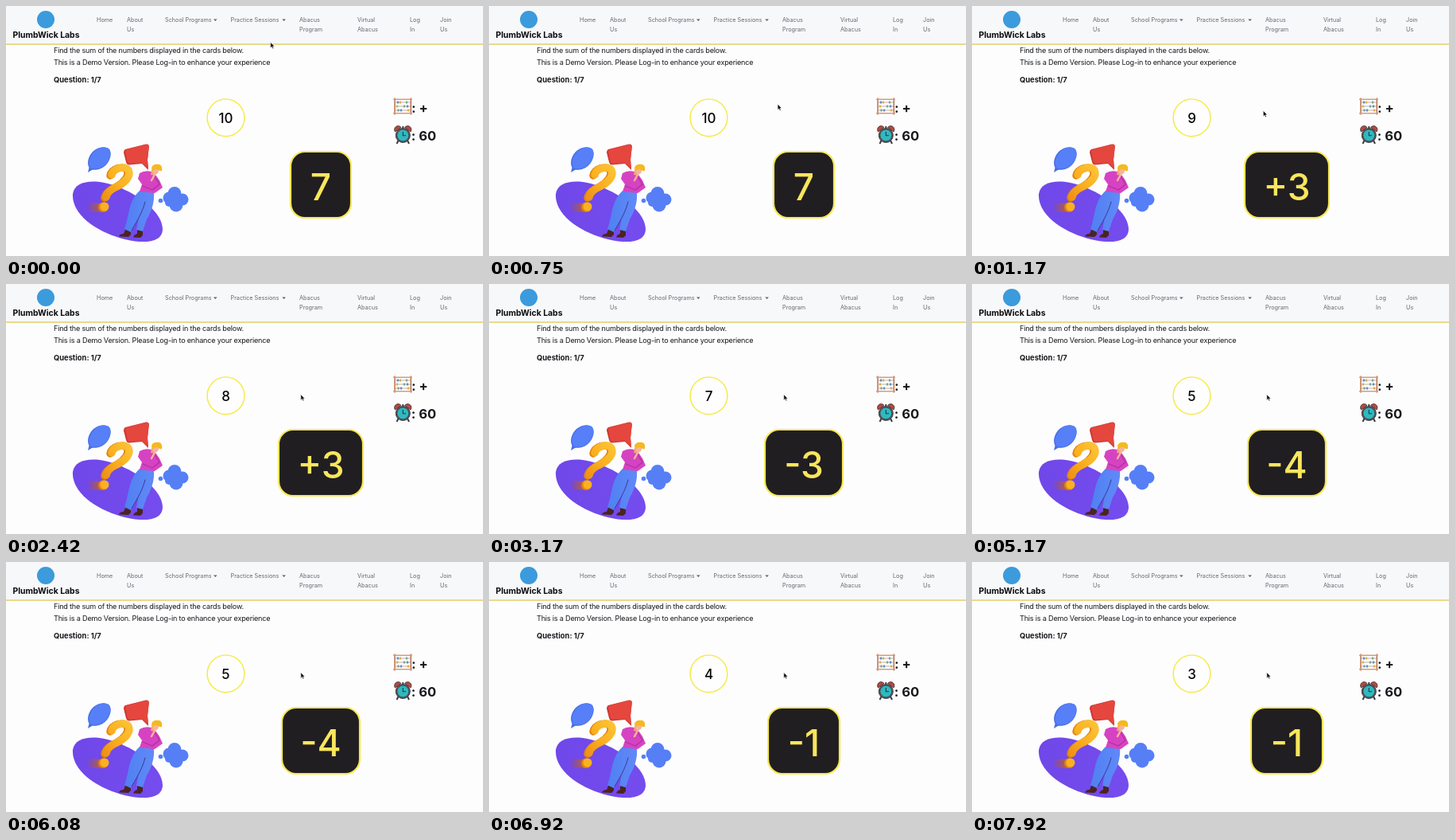
These frames come from a looping animation (600 px wide and 314 px high, 8000 ms). An HTML page:

```html
<!DOCTYPE html>
<html lang="en">
<head>
<meta charset="utf-8">
<title>Abacus practice</title>
<style>
  html, body { margin: 0; width: 100%; height: 100%; overflow: hidden; background: #fdfdfe; }
  svg { display: block; width: 100vw; height: 100vh; }
  text { font-family: Inter, "Open Sans", sans-serif; fill: #16181b; white-space: pre; }
  .nav text { font-size: 7.25px; fill: #66686c; }
  .body { font-size: 9.1px; letter-spacing: -.2px; }
  .bold { font-size: 9.35px; font-weight: 700; }
  .stat { font-size: 16.6px; font-weight: 700; }
  .brand { font-size: 10.4px; font-weight: 700; fill: #0c0c0e; }
  .mid { text-anchor: middle; }
  #count { font-size: 17px; font-weight: 500; fill: #050505; }
  #number { font-size: 46px; font-weight: 500; fill: #f9e65c; }
</style>
</head>
<body>
<svg viewBox="0 0 600 314" preserveAspectRatio="none">
  <defs>
    <linearGradient id="rug" x1="0" x2="1"><stop stop-color="#7047e8"/><stop offset="1" stop-color="#754cee"/></linearGradient>
    <linearGradient id="gold" x1="0" y1="1" x2="1" y2="0"><stop stop-color="#f09417"/><stop offset=".5" stop-color="#fbb11f"/><stop offset="1" stop-color="#fcc236"/></linearGradient>
    <linearGradient id="glow" x1="0" x2="1"><stop stop-color="#a4552f" stop-opacity="0"/><stop offset="1" stop-color="#c9681f"/></linearGradient>
    <linearGradient id="denim" x1="0" x2="1"><stop stop-color="#4f80f2"/><stop offset="1" stop-color="#6189f8"/></linearGradient>
  </defs>

  <rect width="600" height="314" fill="#fdfdfe"/>
  <rect width="600" height="48" fill="#f7f8fa"/>
  <rect y="47.2" width="600" height="1.7" fill="#e9d37c"/>
  <circle cx="50" cy="17" r="11" fill="#3b9bdc"/>
  <text class="brand mid" x="50.5" y="39.5">PlumbWick Labs</text>
  <g class="nav" id="nav"></g>

  <text class="body" x="60" y="59.3">Find the sum of the numbers displayed in the cards below.</text>
  <text class="body" x="60" y="73.8">This is a Demo Version. Please Log-in to enhance your experience</text>
  <text class="bold" x="60" y="95.5">Question: 1/7</text>

  <!-- illustration -->
  <g stroke-linecap="round" stroke-linejoin="round">
    <path d="M84 236C86 223 100 219 118 221C152 226 196 254 197 280C197 292 186 297 168 296C130 293 82 268 84 236Z" fill="url(#rug)"/>
    <path d="M101 247L122 248V259L104 258Z" fill="url(#glow)"/>
    <path d="M106 187C111 178 124 174 130 180C135 188 128 202 117 205C112 206.500 110 205 108 206L103 209L104.500 203C102 198 103 192 106 187Z" fill="#486fe6"/>
    <path d="M108 187C113 178 125 175 130 180C135 188 127 201 117 204C112 205 109 204 107 204C103 199 104 193 108 187Z" fill="#567ff8"/>
    <path d="M150 180L176 173.500Q180 173 179.800 177L178 193L179 206L171 198L155 199.500Q152 199.500 151 196L148 184Q148 181 150 180Z" fill="#cb3833"/>
    <path d="M152 180L176 174Q180 173.500 179.800 177L178 193L179 204L171 197L156 198Q153.500 198 152.500 195L150 183Q150 181 152 180Z" fill="#e5463d"/>
    <g fill="none" stroke-width="9.500">
      <path d="M131 213C133 204 147 200 152 206C156 213 148 222 139 227C130 231 125 235 124 241" stroke="#e2850f"/>
      <path d="M133 212C135 204 149 200 154 206C158 214 149 222 141 226C132 230 127 234 126 240" stroke="url(#gold)"/>
    </g>
    <circle cx="122.500" cy="252.500" r="6.300" fill="#e6860f"/>
    <circle cx="124" cy="252" r="5.500" fill="#fbb120"/>
    <g fill="#567ff6">
      <circle cx="205" cy="241" r="7.500"/><circle cx="212" cy="235.500" r="8.500"/><circle cx="222" cy="243" r="7.500"/>
      <circle cx="214" cy="250" r="8.500"/><circle cx="205" cy="247" r="5"/><circle cx="194.500" cy="244.500" r="2.800"/>
    </g>
    <path d="M150 281L157 283L157 287L154 290L142 289.500Q143 286 148 286Z" fill="#4b2420"/>
    <path d="M165 280L172 282L172 288L169 291L160 290.500Q161 287 165 286Z" fill="#4b2420"/>
    <path d="M168 232L186 234C187 247 183 258 177 268L172 283L164 281L167 266L157 284L149 280C155 265 153 246 168 232Z" fill="url(#denim)"/>
    <path d="M175 246C172 257 168 265 158 282" fill="none" stroke="#363e8f" stroke-width="1"/>
    <path d="M168 210Q176 205 186 209L193 219L197 228L187 235L168 233L171 224L166 217Z" fill="#d643c2"/>
    <path d="M187 214L193 224L184 231L172 226" fill="none" stroke="#ae309f" stroke-width="1.300"/>
    <path d="M183 206L188 207L187 213L182 212Z" fill="#efa184"/>
    <ellipse cx="188" cy="206.500" rx="4" ry="5" fill="#f7b498"/>
    <path d="M184 207C181 202 186 198 190 199C195 198 197 202 196 207C192 208 190 204 188 205Q186 206 184 207Z" fill="#f5b91f"/>
    <path d="M183 219L187 212" stroke="#f7b498" stroke-width="2.500"/>
  </g>

  <!-- abacus -->
  <g id="abacus">
    <path d="M489 115.500V136.500M509.300 115.500V136.500" stroke="#b9714e" stroke-width="1.500"/>
    <path d="M487 117.300H511M487 134.800H511" stroke="#d99a78" stroke-width="1.500"/>
    <path d="M490 121H509M490 126H509M490 131H509" stroke="#a88f88" stroke-width=".7"/>
  </g>
  <text class="stat" x="510" y="133.500">: +</text>

  <!-- alarm clock -->
  <g>
    <path d="M493.500 169L491.500 173M505 169L507 173" stroke="#3b3b45" stroke-width="2"/>
    <path d="M489.500 158A4.500 4.500 0 0 1 497 152.500ZM509 158A4.500 4.500 0 0 0 501.500 152.500Z" fill="#b9483f" stroke="#40363a" stroke-width=".9"/>
    <path d="M499.300 151V154" stroke="#3b3b45" stroke-width="2"/>
    <circle cx="499.300" cy="162.500" r="9" fill="#7d4a4b" stroke="#3a3a42" stroke-width="1"/>
    <circle cx="499.300" cy="162.500" r="7.400" fill="#2fb9bf" stroke="#2c4f58" stroke-width=".9"/>
    <path d="M499.300 158V162.800H503" fill="none" stroke="#1d3a44" stroke-width="1.100"/>
  </g>
  <text class="stat" x="509.800" y="169">: 60</text>

  <circle cx="276.500" cy="140.300" r="23.400" fill="#fefefe" stroke="#f6e945" stroke-width="1.400"/>
  <text class="mid" id="count" x="276.500" y="146.600"></text>

  <rect id="card" y="183" height="83" rx="18" fill="#201e21" stroke="#f8e854" stroke-width="2.200"/>
  <text class="mid" id="number" x="396" y="243.500"></text>

  <path id="cursor" d="M0 0V7.200L1.700 5.700L2.800 8.200L4.100 7.600L3 5.200H5.200Z" fill="#0a0a0a" stroke="#fff" stroke-width=".6"/>
</svg>
<script>
const LOOP = 8000, FIRST = 1120, STEP = 1000;
const CARDS = ['7', '+3', '+3', '-3', '-4', '-4', '-1', '-1'];
const WIDTHS = { '7': 76, '+3': 106, '-3': 98, '-4': 98, '-1': 90 };
const $ = id => document.getElementById(id);

function add(parent, tag, attrs, text = '') {
  const el = document.createElementNS('http://www.w3.org/2000/svg', tag);
  for (const key in attrs) el.setAttribute(key, attrs[key]);
  el.textContent = text;
  parent.append(el);
}

const MENU = [
  [114, 'Home'], [152, 'About', 'Us'], [200, 'School Programs'], [282.5, 'Practice Sessions'],
  [369, 'Abacus', 'Program'], [442, 'Virtual', 'Abacus'], [508, 'Log', 'In'], [546, 'Join', 'Us']
];
for (const [x, ...lines] of MENU)
  lines.forEach((line, i) => add($('nav'), 'text', { x, y: 20.3 + 11.7 * i }, line));
for (const x of [261, 347.3])
  add($('nav'), 'path', { d: `M${x} 16.500h4.600l-2.300 2.400z`, fill: '#5d5f63' });

const BEADS = ['#5a93c4', '#e0b04a', '#7fa98a'];
const ROWS = [[493, 496, 504], [492, 501, 505], [493.5, 497, 506]];
ROWS.forEach((row, r) => row.forEach((cx, i) =>
  add($('abacus'), 'ellipse', { cx, cy: 121 + 5 * r, rx: 1.3, ry: 1.7, fill: BEADS[(r + i) % 3] })));

function ease(t, from, to) {
  const p = Math.min(1, Math.max(0, (t - from) / (to - from)));
  return p * p * (3 - 2 * p);
}

function render(t) {
  const i = t < FIRST ? 0 : 1 + Math.floor((t - FIRST) / STEP);
  const label = CARDS[i], width = WIDTHS[label];
  $('count').textContent = 10 - i;
  $('number').textContent = label;
  $('card').setAttribute('x', 396 - width / 2);
  $('card').setAttribute('width', width);

  const sweep = ease(t, 120, 900), settle = ease(t, 1180, 1600);
  const x = 332.7 + 33.6 * sweep + 4.5 * settle;
  const y = 45.5 + 86 * sweep + 7.2 * settle;
  $('cursor').setAttribute('transform', `translate(${x} ${y})`);
}

const start = performance.now();
function tick() {
  render((performance.now() - start) % LOOP);
  requestAnimationFrame(tick);
}
tick();
</script>
</body>
</html>
```
